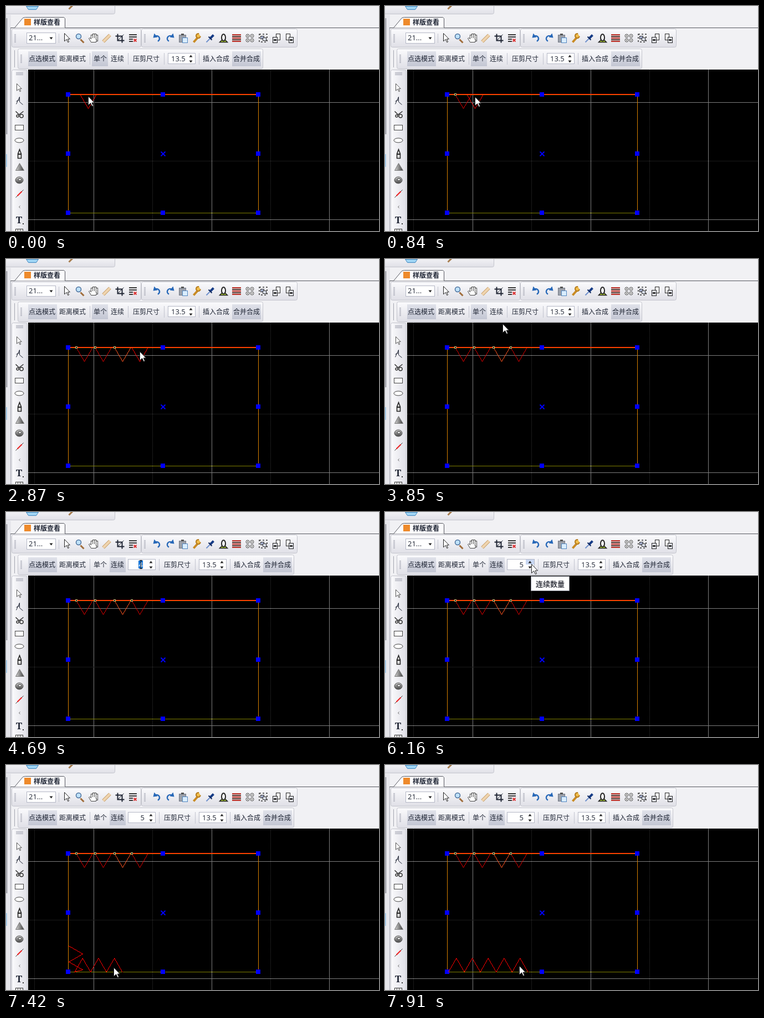
Recreate the animation shown at these times as an HTML page with a canvas. Size 673 px wide and 407 px high, loop 8 s.

```html
<!DOCTYPE html>
<html lang="zh-CN">
<head>
<meta charset="utf-8">
<style>
html, body { margin: 0; width: 100%; height: 100%; overflow: hidden; background: #f1f1f4; }
canvas { display: block; }
</style>
</head>
<body>
<canvas id="stage" width="673" height="407"></canvas>
<script>
const g = document.getElementById('stage').getContext('2d');
const LOOP = 8000, STEP = 70, INK = '#1e2433';
const CJK = '"Noto Sans CJK SC", "Noto Sans CJK", sans-serif';
const NUM = '"Open Sans", "Noto Sans", sans-serif';
const BOX = { x: 112, y: 160, w: 343, h: 214 };
const TOOTH = { half: 14.35, depth: 25 };

// Pointer hops: start, duration, destination
const hops = [
  [0, 280, 141, 163], [560, 490, 175, 165], [1260, 420, 210, 167], [2100, 490, 241, 167],
  [3220, 910, 203, 103], [4340, 350, 243, 95], [5180, 350, 264, 94], [6370, 280, 372, 384],
  [6650, 280, 167, 378], [6930, 210, 173, 368], [7140, 770, 242, 363]
];
const clicks = [560, 1260, 1960, 3150];

function pointer(t) {
  let x = 148, y = 163;
  for (const [start, time, toX, toY] of hops) {
    const u = Math.min(1, Math.max(0, (t - start) / time)), ease = u * u * (3 - 2 * u);
    x += (toX - x) * ease;
    y += (toY - y) * ease;
  }
  return [Math.round(x), Math.round(y)];
}

function rect(x, y, w, h, fill, edge) {
  g.fillStyle = fill;
  g.fillRect(x, y, w, h);
  if (edge) {
    g.strokeStyle = edge;
    g.lineWidth = 1;
    g.strokeRect(x + .5, y + .5, w - 1, h - 1);
  }
}

// Flat list of x, y pairs
function path(p, edge, fill, width = 1) {
  g.beginPath();
  for (let i = 0; i < p.length; i += 2) g.lineTo(p[i] + .5, p[i + 1] + .5);
  if (fill) { g.closePath(); g.fillStyle = fill; g.fill(); }
  if (edge) { g.strokeStyle = edge; g.lineWidth = width; g.stroke(); }
}

// Polyline without antialiasing
function crisp(pts, color) {
  for (let i = 1; i < pts.length; i++) {
    const [ax, ay] = pts[i - 1], dx = pts[i][0] - ax, dy = pts[i][1] - ay;
    const n = Math.ceil(Math.max(Math.abs(dx), Math.abs(dy)));
    for (let k = 0; k <= n; k++) rect(Math.round(ax + dx * k / n), Math.round(ay + dy * k / n), 1, 1, color);
  }
}

function oval(x, y, rx, ry, edge, fill, width = 1, from = 0, to = Math.PI * 2) {
  g.beginPath();
  g.ellipse(x, y, rx, ry, 0, from, to);
  if (fill) { g.fillStyle = fill; g.fill(); }
  if (edge) { g.strokeStyle = edge; g.lineWidth = width; g.stroke(); }
}

function label(s, x, y, font = '12px ' + CJK, color = INK, align = 'left') {
  g.font = font;
  g.fillStyle = color;
  g.textAlign = align;
  g.fillText(s, x, y);
}

function shade(x, y, w, h, from, to) {
  const f = g.createLinearGradient(x, y, x + w, y + h);
  f.addColorStop(0, from);
  f.addColorStop(1, to);
  return f;
}

function bar(x, y, w, h, across) {
  g.beginPath();
  g.roundRect(x + .5, y + .5, w - 1, h - 1, 3);
  g.fillStyle = across ? shade(x, 0, w, 0, '#fbfbfd', '#dfdfe6') : shade(0, y, 0, h, '#fbfbfd', '#dfdfe6');
  g.fill();
  g.strokeStyle = '#c3c4cc';
  g.lineWidth = 1;
  g.stroke();
}

function dots(x, y, w, h, color) {
  for (let i = 0; i < Math.max(w, h); i += 2) rect(w ? x + i : x, h ? y + i : y, 1, 1, color);
}

function grip(x, y, h) {
  for (let i = 0; i < h; i += 2) rect(x, y + i, 3, 1, '#a9abb7');
}

function arrow(x, y, size = 1, fill = '#fff', edge = '#222') {
  const p = [0, 0, 0, 16, 4, 12, 7, 18, 9, 17, 6.5, 11.5, 11, 11.5];
  path(p.map((v, i) => v * size + (i % 2 ? y : x)), edge, fill);
}

function chevron(x, y, up) {
  path([x - 3, y, x, y - up * 4, x + 3, y], null, '#222');
}

function spinner(x, value, hot, selected) {
  rect(x, 85, 50, 20, '#fff', '#b5b8c6');
  if (hot) rect(x + 34, 86, 15, 9, '#c9d8f3');
  chevron(x + 41, 92, 1);
  chevron(x + 41, 98, -1);
  if (selected) rect(x + 19, 88, 8, 14, '#1673d1');
  label(value, x + (selected ? 27 : 30), 100, '13px ' + NUM, selected ? '#fff' : INK, 'right');
}

// Icons are drawn around their own centre
function turn(d) {
  oval(0, 1, 5, 5, '#2768b8', null, 2.5, d > 0 ? -2 : -4.3, d > 0 ? 1.2 : -1.1);
  path([-5 * d, -9, -7 * d, -1, 1 * d, -2], null, '#2768b8');
}

function sheets(d) {
  rect(d > 0 ? -1 : -7, -8, 8, 12, '#fff', '#222');
  rect(d > 0 ? -7 : -2, -2, 9, 11, '#e4e6ee', '#222');
  rect(d > 0 ? -5 : 0, 2, 5, 3, '#333');
}

const editIcons = [
  () => arrow(-4, -9, .9),
  () => {
    path([1, 2, 7, 8], '#a06d3c', null, 3);
    oval(-2, -3, 4.5, 4.5, '#4a6f9c', '#bfe2fa', 1.5);
  },
  () => {
    for (let i = 0; i < 4; i++) rect(-4 + i * 3, i % 3 ? -8 : -6, 4, 12, '#fff', '#444');
    path([-4, 7, -8, 0, -6, -1, -3, 2, 6, 2, 5, 7], '#444', '#fff');
    rect(-3, 0, 8, 4, '#fff');
  },
  () => {
    path([-6, 6, 6, -6], '#c39a63', null, 6);
    path([-6, 6, 6, -6], '#f0d4ae', null, 4);
  },
  () => {
    path([-4, -8, -4, 4, 8, 4], INK, null, 2);
    path([-8, -4, 4, -4, 4, 8], INK, null, 2);
    path([-4, 4, 7, -7], INK);
  },
  () => {
    for (let i = 0; i < 4; i++) rect(-7, -7 + i * 4, i < 2 ? 14 : 7, 2, '#383838');
    path([1, 1, 6, 6], '#d33', null, 2);
    path([6, 1, 1, 6], '#d33', null, 2);
  }
];

const toolIcons = [
  () => turn(1),
  () => turn(-1),
  () => {
    rect(-8, -6, 13, 14, '#9ba0aa', '#737985');
    rect(-4, -8, 5, 3, '#555');
    rect(-2, -1, 10, 10, '#d9edff', '#5487c0');
  },
  () => {
    path([-6, 7, 2, -2], '#c98b25', null, 4);
    oval(3, -4, 4, 4, '#b57b1d', '#f0bd4c', 2, .2, 5);
  },
  () => {
    path([-7, 7, 0, 0], '#6f91cc', null, 2);
    path([0, 0, 6, -6], '#163c86', null, 4);
    path([-3, -3, 3, 3], '#102a60', null, 2);
  },
  () => {
    path([-7, 7, -3, 3, 3, 3, 7, 7], '#222', '#b6d636', 1.5);
    oval(.5, -1, 3.5, 6, '#222', '#fff', 2);
  },
  () => { for (let i = 0; i < 5; i++) rect(-8, -7 + i * 3, 16, 2, i % 2 ? '#553027' : '#b82920'); },
  () => {
    for (const x of [-4, 4]) for (const y of [-4, 4]) {
      oval(x, y, 3, 3, '#444', '#fff');
      rect(x - 1, y - 1, 2, 2, '#777');
    }
  },
  () => {
    g.setLineDash([3, 3]);
    g.strokeStyle = '#333';
    g.lineWidth = 1.5;
    g.strokeRect(-7, -7, 14, 14);
    g.setLineDash([]);
    rect(-5, -4, 7, 6, '#aab4d4', '#333');
    rect(-1, -1, 7, 6, '#dde3f5', '#333');
  },
  () => sheets(1),
  () => sheets(-1)
];

const sideIcons = [
  () => arrow(-5, -7, .8, '#fff', '#555'),
  () => {
    path([-6, 6, 0, -7, 0, 2, 6, 7], INK);
    path([-6, 1, 0, -2], INK);
  },
  () => {
    path([-7, -5, -1, 1, 7, -5], '#333', null, 1.5);
    oval(-3, 4, 2, 2, '#333', '#fff', 1.5);
    oval(4, 4, 3, 3, '#333', '#fff', 1.5);
  },
  () => rect(-8, -4, 16, 10, '#fff', '#444'),
  () => oval(0, 0, 8, 4, '#444', '#fff'),
  () => {
    path([-3, 8, -3, 0, 0, -8, 3, 0, 3, 8], '#222', '#ddd', 1.5);
    rect(-3, 0, 7, 2, '#222');
  },
  () => path([-7, 6, 0, -7, 8, 6], '#777', shade(-7, 0, 15, 0, '#ddd', '#444')),
  () => {
    oval(0, 0, 7, 6, '#555', shade(0, -6, 0, 12, '#ccc', '#444'));
    oval(1, -1, 3, 2, '#333', '#eee');
  },
  () => {
    path([-7, 7, 7, -7], '#333');
    path([-4, 4, 4, -4], '#e22', null, 2);
  },
  () => path([1, -2, -1, 0, 1, 2], '#555'),
  () => {
    label('T', -6, 6, 'bold 17px "Noto Serif", "Liberation Serif", serif');
    rect(6, 6, 2, 2, '#333');
  },
  () => { for (let i = 0; i < 3; i++) rect(-7 + i * 4, -8, 6, 9, '#fff', '#333'); }
];

function series(icons, x, y, dx, dy) {
  icons.forEach((icon, i) => {
    g.save();
    g.translate(x + i * dx, y + i * dy);
    icon();
    g.restore();
  });
}

function frameWindow() {
  rect(0, 0, 673, 407, '#f1f1f4');
  bar(-6, -8, 203, 23);
  path([36, 0, 40, 6, 54, 6, 58, 0], '#4386bd', '#9ed4f4');
  path([113, 5, 121, -3], '#a77d4e', null, 3);
  rect(0, 16, 9, 391, '#e6e6eb');
  rect(1, 22, 1, 210, '#5e606a');
  rect(0, 268, 2, 23, '#a8cbe8');
  rect(8, 39, 1, 368, '#a4a6b1');
  rect(8, 39, 665, 1, '#55575f');
  const tab = [15, 39, 30, 21, 34, 20, 104, 20, 106, 22, 106, 39];
  path(tab, null, '#fbfbfd');
  path(tab, '#55575f');
  rect(33, 23, 12, 12, '#ee8a2b');
  label('样版查看', 50, 34, 'bold 12px ' + CJK);
  bar(10, 41, 234, 34);
  bar(244, 41, 282, 34);
  grip(15, 51, 15);
  grip(249, 51, 15);
  rect(37, 48, 53, 20, '#fff', '#b5b8c6');
  label('21...', 41, 62, '13px ' + NUM);
  chevron(81, 56, -1);
  rect(95, 50, 1, 17, '#c5c7d1');
  series(editIcons, 109, 58, 24, 0);
  series(toolIcons, 272, 58, 24, 0);
  bar(10, 115, 29, 300, true);
  for (let i = 0; i < 3; i++) rect(18, 120 + i * 2, 13, 1, '#a9abb7');
  series(sideIcons, 24, 147, 0, 24);
}

function options(t) {
  const many = t >= 4130, dx = many ? 56 : 0;
  const on = (x, w) => rect(x, 82, w, 27, shade(0, 82, 0, 27, '#e0e2ea', '#c3c6d3'));
  bar(21, 77, 443 + dx, 37);
  rect(15, 80, 1, 31, '#a4a6b1');
  grip(26, 88, 16);
  on(40, 52);
  on(many ? 187 : 155, 29);
  on(408 + dx, 52);
  label('点选模式', 41, 100);
  label('距离模式', 96, 100);
  label('单个', 158, 100);
  label('连续', 189, 100);
  label('压剪尺寸', 229 + dx, 100);
  label('插入合成', 355 + dx, 100);
  label('合并合成', 410 + dx, 100);
  for (const x of [151, 220 + dx, 285 + dx, 348 + dx]) rect(x, 85, 1, 21, '#c3c5d0');
  if (many) spinner(220, t < 6020 ? '4' : '5', t >= 5320 && t < 6370, t >= 4550 && t < 6020);
  spinner(292 + dx, '');
  label('13.5', 298 + dx, 100, '13px ' + NUM);
}

function board() {
  const { x, y, w, h } = BOX;
  rect(40, 115, 633, 292, '#000');
  for (let i = 0; i < 3; i++) {
    dots(51 + i * 213, 115, 0, 292, '#333');
    rect(158 + Math.round(i * 212.5), 115, 1, 292, '#7d7d7d');
  }
  dots(40, 280, 633, 0, '#333');
  for (const row of [174, 386]) rect(40, row, 633, 1, '#7d7d7d');

  // Red outline under a yellow selection
  rect(x, y - 1, w, 2, '#f00');
  dots(x, y, w, 0, '#ff0');
  for (const side of [x, x + w]) {
    rect(side, y, 1, h, '#b00000');
    dots(side, y, 0, h, '#ff0');
  }
  dots(x, y + h, w, 0, '#ff0');
  for (let i = 0; i < 9; i++) {
    const hx = Math.floor(x + i % 3 * w / 2), hy = y + Math.floor(i / 3) * h / 2;
    if (i !== 4) rect(hx - 4, hy - 4, 8, 8, '#00f');
    else for (const d of [-4, 4]) path([hx - 4, hy - d, hx + 4, hy + d], '#00f', null, 2);
  }
}

function notch(x, color) {
  crisp([[x, 161], [x + 14, 185], [x + 28, 161]], color);
}

// Five teeth wrapped around the lower left corner; s = 0 is the corner
function chain(start, below) {
  const { half, depth } = TOOTH, left = BOX.x + 1, floor = BOX.y + BOX.h;
  const at = s => s < 0 ? [left, floor + s] : [left + s, floor];
  const pts = [at(start)];
  for (let i = 0; i < 5; i++) {
    const s = start + i * half * 2;
    pts.push(s < 0 ? [left + depth, floor + s + half] : [left + s + half, floor + (below ? depth : -depth)]);
    pts.push(at(s + half * 2));
  }
  crisp(pts, '#f00');
}

function draw(t) {
  const [x, y] = pointer(t);
  frameWindow();
  board();
  options(t);
  clicks.filter(c => t >= c).forEach((c, i) => {
    const left = pointer(c)[0] - 14;
    notch(left, i === 2 ? '#ff5520' : '#d80000');
    rect(left - 2, 158, 4, 4, '#000', '#c8c880');
  });
  if (t < 3150) notch(x - 14, '#f00');
  if (t >= 6580) chain(x - 241, y > BOX.y + BOX.h);
  if (t >= 6160 && t < 6370) {
    rect(263, 116, 70, 27, '#fff', '#888b96');
    label('连续数量', 272, 135, 'bold 13px ' + CJK, '#3d3f48');
  }
  if (t >= 4620 && t < 5320) {
    rect(x, 88, 1, 14, '#111');
    for (const end of [87, 102]) rect(x - 2, end, 5, 1, '#111');
  } else arrow(x, y);
}

function tick() {
  const t = performance.now() % LOOP;
  draw(Math.floor(t / STEP) * STEP);
  requestAnimationFrame(tick);
}
tick();
</script>
</body>
</html>
```
